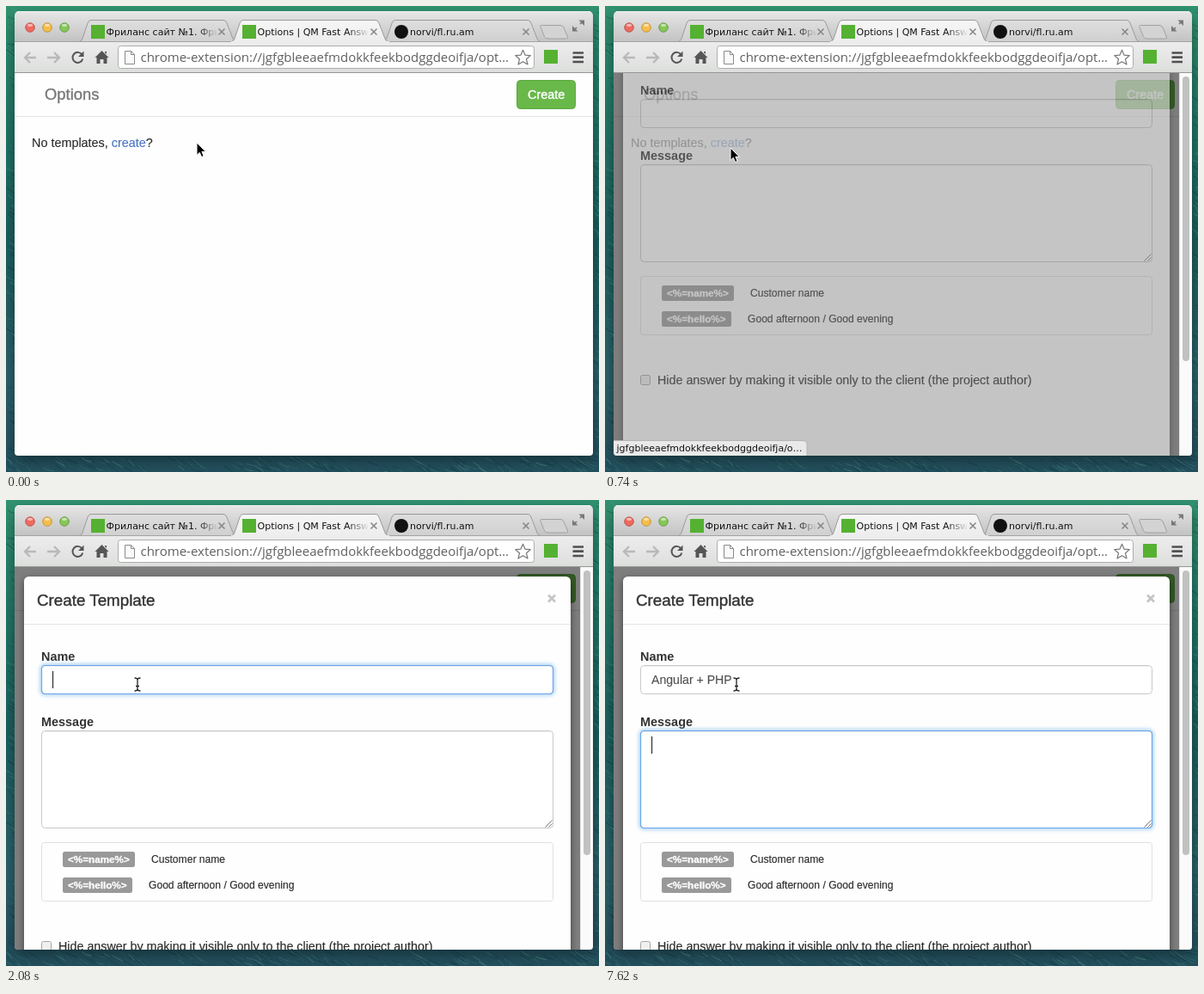
An HTML page that plays this animation: 690 px wide and 542 px high, repeating every 8000 ms.

```html
<!DOCTYPE html>
<html lang="en">
<head>
<meta charset="utf-8">
<title>Create Template</title>
<style>
  html, body { margin: 0; width: 100%; height: 100%; overflow: hidden; background: #1f5a5c; }
  svg { display: block; width: 690px; height: 542px; }
  text { font-family: "Liberation Sans", Arial, sans-serif; white-space: pre; }
  .ui { font: 11px "DejaVu Sans", sans-serif; }
  .url { font: 15px "Open Sans", "Noto Sans", sans-serif; fill: #606060; }
  .body { font-size: 14.4px; fill: #2b2b2b; stroke: #2b2b2b; stroke-width: .15; }
  .label { font-size: 14.45px; font-weight: bold; fill: #333; }
  .tag { font-size: 11.7px; font-weight: bold; fill: #fff; stroke: #fff; stroke-width: .3; }
  .hint { font-size: 12.1px; fill: #2b2b2b; stroke: #2b2b2b; stroke-width: .15; }
  .typed { font-size: 14.1px; fill: #505050; stroke: #505050; stroke-width: .12; }
  .field { fill: #fff; stroke: #c8c8c8; }
  .glow { fill: none; stroke: #66afe9; stroke-width: 4; filter: url(#soft); }
  .ring { fill: none; stroke: #6aa5ea; stroke-width: 1.2; }
  .icon { fill: none; stroke: #555; stroke-width: 2; }
  .tab { stroke: #9b9b9b; }
  .close { stroke: #858585; stroke-width: 1.5; }
</style>
</head>
<body>
<svg viewBox="0 0 690 542" xmlns="http://www.w3.org/2000/svg">
  <defs>
    <linearGradient id="sea" x2="0" y2="1">
      <stop offset="0" stop-color="#319270"/>
      <stop offset=".22" stop-color="#237a68"/>
      <stop offset=".5" stop-color="#1b605f"/>
      <stop offset=".8" stop-color="#2c626b"/>
      <stop offset="1" stop-color="#234f5d"/>
    </linearGradient>
    <linearGradient id="strip" x2="0" y2="1">
      <stop offset="0" stop-color="#e6e6e6"/>
      <stop offset="1" stop-color="#c3c3c3"/>
    </linearGradient>
    <linearGradient id="bar" x2="0" y2="1">
      <stop offset="0" stop-color="#ededed"/>
      <stop offset="1" stop-color="#dcdedc"/>
    </linearGradient>
    <linearGradient id="idle" x2="0" y2="1">
      <stop offset="0" stop-color="#dedede"/>
      <stop offset="1" stop-color="#d0d0d0"/>
    </linearGradient>
    <linearGradient id="active" x2="0" y2="1">
      <stop offset="0" stop-color="#f6f6f6"/>
      <stop offset="1" stop-color="#ededed"/>
    </linearGradient>
    <linearGradient id="fade1" gradientUnits="userSpaceOnUse" x1="222" x2="247" y1="0" y2="0">
      <stop offset="0" stop-color="#111"/>
      <stop offset="1" stop-color="#111" stop-opacity="0"/>
    </linearGradient>
    <linearGradient id="fade2" gradientUnits="userSpaceOnUse" x1="398" x2="422" y1="0" y2="0">
      <stop offset="0" stop-color="#111"/>
      <stop offset="1" stop-color="#111" stop-opacity="0"/>
    </linearGradient>
    <filter id="soft" x="-5%" y="-50%" width="110%" height="200%"><feGaussianBlur stdDeviation="2.2"/></filter>
    <filter id="shade" x="-10%" y="-10%" width="120%" height="120%"><feGaussianBlur stdDeviation="8"/></filter>
    <filter id="lift" x="-5%" y="-5%" width="110%" height="110%"><feGaussianBlur stdDeviation="4"/></filter>
    <clipPath id="page"><path d="M10 78H683V519a4 4 0 0 1-4 4H14a4 4 0 0 1-4-4Z"/></clipPath>
  </defs>

  <rect width="690" height="542" fill="url(#sea)"/>
  <g id="waves" fill="none"></g>
  <rect x="10" y="14" width="673" height="514" rx="5" fill="#000" opacity=".42" filter="url(#shade)"/>

  <!-- window frame -->
  <path d="M10 41V11a5 5 0 0 1 5-5H678a5 5 0 0 1 5 5V41Z" fill="url(#strip)"/>
  <path d="M13 6.500H680" stroke="#f2f2f2"/>
  <g id="lights" stroke-width=".8"></g>
  <g id="tabs"></g>
  <path d="M621.500 23.500q0-1 2-1H645q3 0 4 2.500L653.500 36q.6 2-2 2H631q-3.500 0-4.500-2.500Z" fill="#d3d3d3" stroke="#a2a2a2"/>
  <path d="M668 21l3.500-3.500M664 25l-3.500 3.500" stroke="#777" stroke-width="1.700"/>
  <path d="M666.500 16.500H673V23ZM659 23V29.500H665.500Z" fill="#777"/>
  <rect x="10" y="41" width="673" height="37" fill="url(#bar)"/>
  <path d="M10 41.500H262M446 41.500H683" stroke="#a3a3a3"/>
  <path d="M10 77.500H683" stroke="#969696"/>
  <g id="marks"></g>

  <!-- toolbar -->
  <g fill="none" stroke="#b9b9b9" stroke-width="2.400">
    <path d="M35 60H22.500M28 54l-6 6 6 6"/>
    <path d="M48 60H61.500M56 54l6 6-6 6"/>
  </g>
  <path class="icon" d="M88.500 56.500a6 6 0 1 0 .8 5"/>
  <path d="M90.500 52.500V59H84Z" fill="#555"/>
  <path d="M111.500 52 119.500 60H117.500V67H113.500V62H109.500V67H105.500V60H103.500ZM115 53h2v3l-2-2Z" fill="#555"/>
  <rect x="130.500" y="46.500" width="484" height="26" rx="3" fill="#fff" stroke="#adadad"/>
  <path d="M138.500 52.500H145.500L149.500 56.500V67.500H138.500ZM145.500 52.500V56.500H149.500" fill="#fafafa" stroke="#8a8a8a"/>
  <text class="url" x="156.500" y="65">chrome-extension://jgfgbleeaefmdokkfeekbodggdeoifja/opt…</text>
  <path id="star" fill="#fff" stroke="#777" stroke-width="1.200" stroke-linejoin="round"/>
  <path d="M659.500 54.500H672M659.500 59.700H672M659.500 65H672" stroke="#505050" stroke-width="2.700"/>

  <!-- page -->
  <g clip-path="url(#page)">
    <rect x="10" y="78" width="673" height="445" fill="#fefefe"/>
    <path d="M10 128.500H683" stroke="#e4e4e4"/>
    <text x="45" y="109" font-size="18.400" fill="#777" stroke="#777" stroke-width=".35">Options</text>
    <rect x="594.500" y="86.500" width="68" height="33" rx="4" fill="#69b84a" stroke="#5ca83e"/>
    <text x="607" y="108" font-size="14.400" fill="#fff" stroke="#fff" stroke-width=".4">Create</text>
    <text class="body" x="30" y="164">No templates, <tspan id="link">create</tspan>?</text>
    <path id="under" d="M122 166.500H163" stroke="#2c4280"/>
    <rect id="dim" x="10" y="78" width="673" height="445"/>

    <g id="modal">
      <rect x="21" y="92" width="636" height="573" rx="6" opacity=".5" filter="url(#lift)"/>
      <rect x="21" y="89" width="636" height="573" rx="5.500" fill="#fefefe"/>
      <text x="36" y="123" font-size="18.800" fill="#333" stroke="#333" stroke-width=".4">Create Template</text>
      <path d="M631 110.500l8 8m0-8l-8 8" stroke="#c4c4c4" stroke-width="2.600"/>
      <path d="M21 144.500H657" stroke="#e5e5e5"/>

      <text class="label" x="41" y="187">Name</text>
      <g id="nameField"></g>
      <text class="typed" id="typed" x="54" y="214"></text>

      <text class="label" x="41" y="263">Message</text>
      <g id="messageField"></g>
      <path d="M627.500 380.500l8-8M631.500 380.500l4-4" stroke="#777"/>
      <rect id="caret" width="1.100" fill="#222"/>

      <rect x="41.500" y="398.500" width="595" height="68" rx="3" fill="#fefefe" stroke="#e0e0e0"/>
      <rect x="66" y="409" width="84" height="18" rx="2.500" fill="#999"/>
      <text class="tag" x="72" y="422">&lt;%=name%&gt;</text>
      <text class="hint" x="169" y="422">Customer name</text>
      <rect x="66" y="439" width="81" height="18" rx="2.500" fill="#999"/>
      <text class="tag" x="72" y="452">&lt;%=hello%&gt;</text>
      <text class="hint" x="166" y="452">Good afternoon / Good evening</text>
      <rect x="41.500" y="513.500" width="11" height="11" rx="2" fill="#f0f0f0" stroke="#a5a5a5"/>
      <text class="body" x="61" y="524" style="font-size:14.300px">Hide answer by making it visible only to the client (the project author)</text>
    </g>

    <g id="scroll">
      <rect x="668" y="78" width="15" height="445" fill="#fafafa"/>
      <path d="M668.500 78V523" stroke="#e3e3e3"/>
      <rect x="672" y="82" width="8" height="331" rx="4" fill="#c1c1c1"/>
    </g>

    <g id="status">
      <path d="M9.500 505.500H231q4 0 4 4V524H9.500Z" fill="#e9e9e9" stroke="#b5b5b5"/>
      <text class="ui" x="13.500" y="518" fill="#111">jgfgbleeaefmdokkfeekbodggdeoifja/o…</text>
    </g>
  </g>

  <g id="cursor">
    <path id="arrow" d="M0 0V14.500L3.300 11.400 5.600 16.600 8.100 15.500 5.900 10.400H10.300Z" stroke="#fff" stroke-linejoin="round"/>
    <path id="hand" d="M-1.500 1.500q1.500-2.500 3 0L3 7q1-2 2.500-.3Q7 5.500 8 7.200q2-.9 2.500 1.200Q11.500 12 9 17.500H1.500L-4.500 10q-1-2.500 1.500-1.800L0 10.500Z" fill="#fff" stroke="#000"/>
    <g id="beam" fill="none">
      <path d="M-3.500-7Q0-7 0-5Q0-7 3.500-7M0-5.500V6.500M-3.500 8Q0 8 0 6Q0 8 3.500 8M-2 2.500H2" stroke="#fff" stroke-width="3" opacity=".8"/>
      <path d="M-3.500-7Q0-7 0-5Q0-7 3.500-7M0-5.500V6.500M-3.500 8Q0 8 0 6Q0 8 3.500 8M-2 2.500H2" stroke="#222" stroke-width="1.300"/>
    </g>
  </g>
</svg>

<script>
const LOOP = 8000;
const $ = id => document.getElementById(id);

// --- fixed parts made by rule ---
let seed = 7;
const rnd = () => (seed = seed * 16807 % 2147483647) / 2147483647;
const tones = ['#0b3540', '#56a596', '#0f3646', '#3d8578'];
let waves = '';
for (let i = 0; i < 420; i++) {
  const side = rnd(), u = rnd();
  const x = side < .3 ? u * 10 : side < .55 ? 683 + u * 7 : u * 690;
  const y = side < .55 ? rnd() * 542 : 524 + rnd() * 18;
  waves += `<path d="M${x} ${y}q4 ${1 + rnd() * 3} ${6 + rnd() * 8} ${3 + rnd() * 6}" stroke="${tones[i % 4]}" opacity="${.2 + rnd() * .35}"/>`;
}
$('waves').innerHTML = waves;

$('lights').innerHTML = [['#ee6a5f', '#b64a42'], ['#f4bd4b', '#bd8b2c'], ['#86c75a', '#5b933a']]
  .map(([fill, edge], i) => {
    const x = 28 + 20 * i;
    return `<circle cx="${x}" cy="25" r="5.300" fill="${fill}" stroke="${edge}"/>` +
      `<ellipse cx="${x}" cy="22.300" rx="3" ry="1.600" fill="#fff" opacity=".55"/>`;
  }).join('');

const tab = (x, fill) =>
  `<path class="tab" fill="url(#${fill})" d="M${x} 41.500q3-.5 4-3.500L${x + 10} 20q1-3.500 4-3.500H${x + 168}q3 0 4 3.500L${x + 179} 38q1 3 4 3.500"/>`;
$('tabs').innerHTML = tab(85, 'idle') + tab(439, 'idle') + tab(262, 'active');

const square = (x, y) => `<rect x="${x}" y="${y}" width="16" height="16" fill="#55b131"/>`;
const title = (x, fill, s) => `<text class="ui" x="${x}" y="34" fill="${fill}">${s}</text>`;
$('marks').innerHTML = square(99, 22) + square(275, 22) + square(626, 51) +
  '<circle cx="460" cy="30" r="8" fill="#111"/>' +
  title(116.5, 'url(#fade1)', 'Фриланс сайт №1. Фри') +
  title(292.5, 'url(#fade2)', 'Options | QM Fast Answer') +
  title(470, '#111', 'norvi/fl.ru.am') +
  [251, 428, 605].map(x => `<path class="close" d="M${x - 3.5} 26.500l7 7m0-7l-7 7"/>`).join('');

$('star').setAttribute('d', 'M' + Array.from({ length: 10 }, (_, i) => {
  const r = i % 2 ? 4.2 : 9.3, a = i * Math.PI / 5;
  return [601.5 + r * Math.sin(a), 60.5 - r * Math.cos(a)].map(v => v.toFixed(1)).join(' ');
}).join('L') + 'Z');

const field = (id, y, h) => {
  const rect = cls => `<rect class="${cls}" x="41.500" y="${y + .5}" width="595" height="${h - 1}" rx="4"/>`;
  $(id).innerHTML = rect('glow') + rect('field') +
    `<path d="M44 ${y + 1.5}H634" stroke="#eee"/>` + rect('ring');
};
field('nameField', 192, 34);
field('messageField', 268, 114);

// --- tables of steps: [time, value...] ---
const cursorSteps = [
  [0, 222, 159, 'arrow'], [150, 188, 161, 'arrow'], [300, 150, 162, 'beam'],
  [450, 135, 160, 'hand'], [740, 146, 165, 'arrow'], [890, 163, 177, 'arrow'],
  [1040, 163, 205, 'beam'], [1190, 160, 230, 'arrow'], [1340, 157, 240, 'arrow'],
  [1490, 156, 236, 'arrow'], [1640, 154, 222, 'beam'], [1790, 153, 214, 'beam']
];
const dimSteps = [[0, 0], [600, .39], [740, .5]];
const statusSteps = [[0, 0], [450, .6], [600, 1], [890, .75], [1040, .3], [1190, 0]];
const modalSteps = [[0, 0, 0], [740, -84, .55], [890, -11, 1], [1040, 0, 1]];
const nameSteps = [[0, 0], [1930, .5], [2080, 1], [7470, .5], [7620, 0]];
const messageSteps = [[0, 0], [7470, .5], [7620, 1]];
const caretSteps = [
  [0, 0], [1930, 1], [2520, 0], [2970, 1], [4020, 0], [4170, 1],
  [5370, 0], [5520, 1], [6570, 0], [6720, 1]
];
const phrase = 'Angular + PHP';
const keyTimes = [3120, 3420, 4170, 4320, 4470, 4620, 4920, 5520, 5970, 6120, 6720, 6870, 7020];

const at = (steps, t) => steps.reduce((hit, s) => s[0] <= t ? s : hit).slice(1);
const show = (id, on) => $(id).setAttribute('opacity', Number(on));
const pen = document.createElement('canvas').getContext('2d');
pen.font = '14.1px "Liberation Sans", Arial, sans-serif';

function focus(id, amount) {
  $(id).querySelector('.glow').style.opacity = amount * .6;
  $(id).querySelector('.ring').style.opacity = amount;
}

function draw(t) {
  const [x, y, kind] = at(cursorSteps, t);
  $('cursor').setAttribute('transform', `translate(${x} ${y})`);
  for (const id of ['arrow', 'hand', 'beam']) show(id, id === kind);

  const hover = kind === 'hand';
  const linkColor = hover ? '#2c4280' : '#4a74c4';
  $('link').setAttribute('fill', linkColor);
  $('link').setAttribute('stroke', linkColor);
  show('under', hover);
  show('dim', at(dimSteps, t)[0]);
  show('status', at(statusSteps, t)[0]);
  show('scroll', t >= 740);

  const [shift, alpha] = at(modalSteps, t);
  $('modal').setAttribute('transform', `translate(0 ${shift})`);
  show('modal', alpha);

  focus('nameField', at(nameSteps, t)[0]);
  focus('messageField', at(messageSteps, t)[0]);

  const text = phrase.slice(0, keyTimes.filter(k => k <= t).length);
  if ($('typed').textContent !== text) $('typed').textContent = text;

  const inMessage = t >= 7470;
  const tall = inMessage || !text;
  const caret = $('caret');
  caret.setAttribute('x', inMessage ? 54 : 54 + pen.measureText(text).width);
  caret.setAttribute('y', inMessage ? 275 : tall ? 199 : 201);
  caret.setAttribute('height', tall ? 20 : 16);
  show('caret', at(caretSteps, t)[0]);
}

const start = performance.now();
function tick() {
  draw((performance.now() - start) % LOOP);
  requestAnimationFrame(tick);
}
tick();
</script>
</body>
</html>
```
